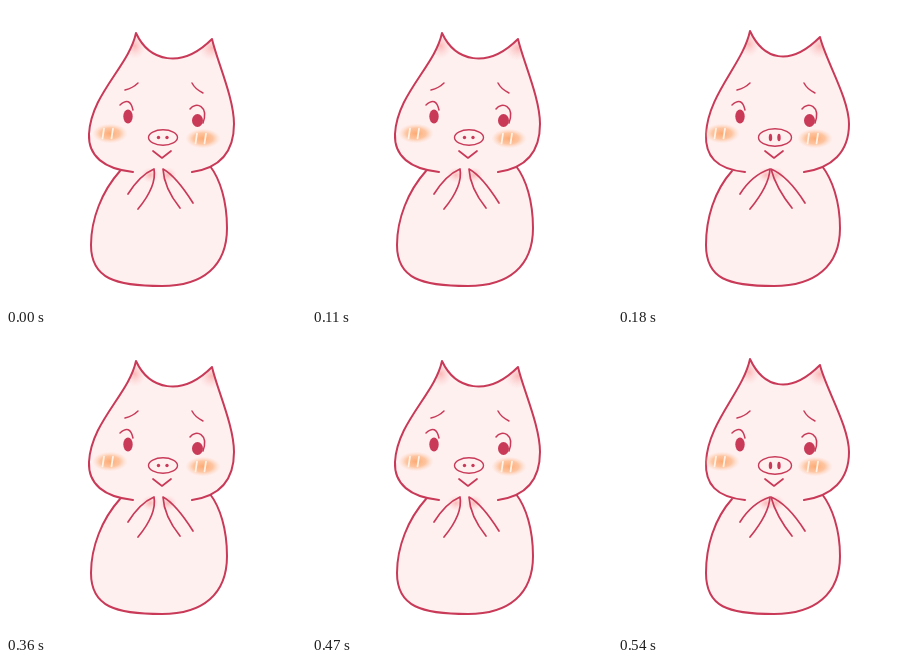
Recreate the animation shown at these times as an HTML page. Size 300x300 px, loop 0.72 s.

```html
<!DOCTYPE html>
<html lang="en">
<head>
<meta charset="utf-8">
<title>Shy pig</title>
<style>
html, body { margin: 0; width: 100%; height: 100%; overflow: hidden; background: #fff; }
svg { display: block; width: 100vw; height: 100vh; }
</style>
</head>
<body>
<svg viewBox="0 0 300 300" fill="none" stroke-linecap="round" stroke-linejoin="round">
  <defs>
    <radialGradient id="blush">
      <stop offset="0" stop-color="#fdaa72"/>
      <stop offset=".55" stop-color="#fdbd92" stop-opacity=".85"/>
      <stop offset="1" stop-color="#fdd9c4" stop-opacity="0"/>
    </radialGradient>
    <radialGradient id="pink">
      <stop offset="0" stop-color="#fbb4b2" stop-opacity=".9"/>
      <stop offset="1" stop-color="#fcd0d0" stop-opacity="0"/>
    </radialGradient>
  </defs>
  <g id="stage"></g>
</svg>
<script>
const SKIN = '#fff0f0', LINE = '#c83a58';
const STEP = 180;

const line = (d, width = 2, color = LINE) =>
  `<path d="${d}" stroke="${color}" stroke-width="${width}"/>`;
const oval = (x, y, rx, ry, fill = LINE, extra = '') =>
  `<ellipse cx="${x}" cy="${y}" rx="${rx}" ry="${ry}" fill="${fill}" ${extra}/>`;
const glow = (x, y, rx, ry, id) => oval(x, y, rx, ry, `url(#${id})`);

function body(left, right) {
  return `<path d="M114 165C96 185 ${left} 213 ${left} 239C${left} 273 110 280 156 280
    C197 280 ${right} 260 ${right} 222C${right} 195 214 173 204 160"
    fill="${SKIN}" stroke="${LINE}" stroke-width="2"/>`;
}

// Ear tips (lx, ly) and (rx, ry), cheeks out to left and right
function head({ lx, ly, rx, ry, left, right }) {
  const leftSide = `127 166C98 163 ${left - 1} 150 ${left} 128C${left + 2} 88 ${lx - 7} ${ly + 33} ${lx} ${ly}`;
  const top = `C${lx + 13} ${ly + 28} ${rx - 31} ${ry + 31} ${rx} ${ry}`;
  const rightSide = `C${rx + 5} ${ry + 22} ${right} 92 ${right} 118C${right} 146 214 162 186 166`;
  const outline = 'M' + leftSide + top + rightSide;
  return `<clipPath id="head"><path d="${outline}Z"/></clipPath>
    <g clip-path="url(#head)"><path d="${outline}Z" fill="${SKIN}"/>
    ${glow(lx - 1, ly + 13, 11, 13, 'pink')}${glow(rx, ry + 9, 14, 13, 'pink')}</g>` + line(outline);
}

// Fingertips meet at x = left and x = right
function hands(left, right) {
  return glow(left - 4, 169, 9, 8, 'pink') + glow(right + 5, 169, 9, 8, 'pink') +
    line(`M122 188Q134 169 ${left} 163Q151 180 132 203`, 1.7) +
    line(`M174 202Q158 182 ${right} 163Q170 170 187 197`, 1.7);
}

function cheek(x, y) {
  const shine = dx => line(`M${x + dx} ${y - 5}l-1.5 10`, 1.7, '#fff3e8');
  return glow(x, y, 18, 10, 'blush') + shine(-6) + shine(3);
}

const face =
  line('M119 84Q127 82 132 77', 1.5) + line('M186 77Q189 83 197 87', 1.5) +
  line('M114 99Q124 90 127 104', 1.5) + oval(122, 110.5, 4.7, 7) +
  line('M184 103C190 95 203 100 197 117', 1.5) + oval(191.5, 114.5, 5.5, 6.5) +
  cheek(104, 127.5) + cheek(197, 132.5);

function snout(size, nostril) {
  return oval(157, 131.5, size, size * .53, SKIN, `stroke="${LINE}" stroke-width="1.4"`) +
    oval(152.5, 131.5, 1.7, nostril) + oval(161, 131.5, 1.7, nostril) +
    line('M147 145L156 152L165 145', 1.7);
}

const pictures = [
  body(85, 221) + head({ lx: 130, ly: 27, rx: 206, ry: 33, left: 83, right: 228 }) +
    hands(148, 157) + face + snout(14.5, 1.7),
  body(88, 222) + head({ lx: 132, ly: 25, rx: 202, ry: 31, left: 88, right: 231 }) +
    hands(152, 153) + face + snout(16.5, 3.8)
];

const stage = document.getElementById('stage');
let shown = -1;
function tick() {
  const now = Math.floor(performance.now() / STEP) % 2;
  if (now !== shown) stage.innerHTML = pictures[shown = now];
  requestAnimationFrame(tick);
}
tick();
</script>
</body>
</html>
```
